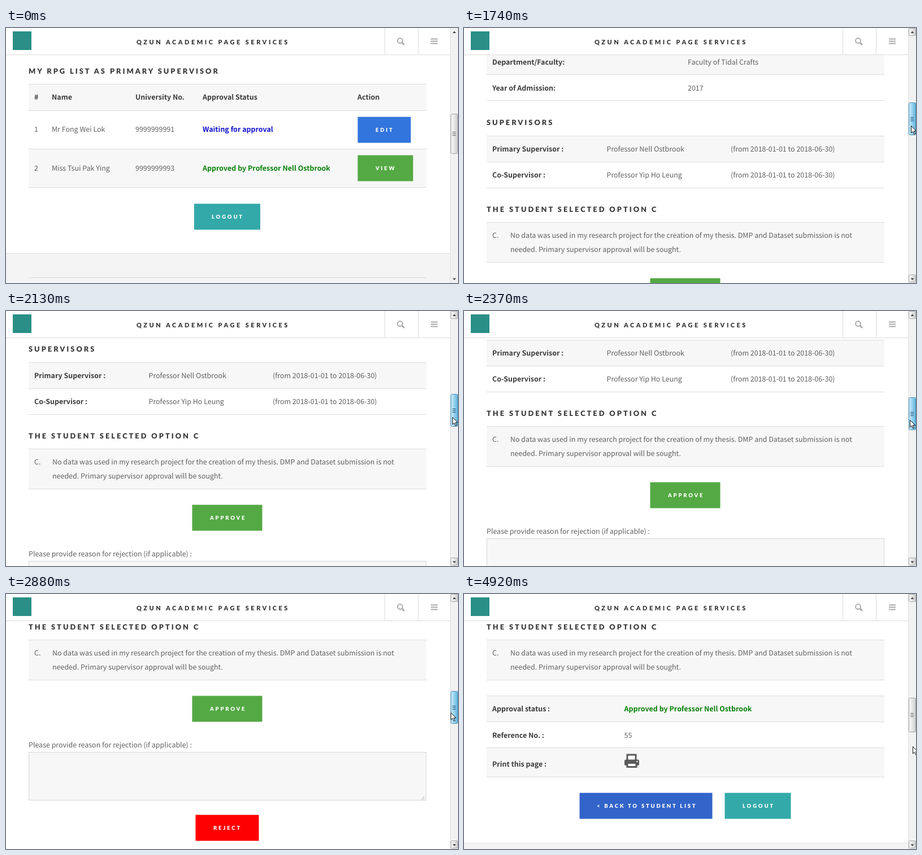
These frames come from a looping animation (800 px wide and 452 px high, 6180 ms). An HTML page:

```html
<!DOCTYPE html>
<html lang="en">
<head>
<meta charset="utf-8">
<title>Thesis approval walkthrough</title>
<style>
  html, body { margin: 0; width: 100%; height: 100%; overflow: hidden; background: #fff; }
  svg { display: block; width: 800px; height: 452px; }
  text { white-space: pre; text-rendering: geometricPrecision; }
  .body, .bold { font: 12.46px "Noto Sans CJK SC", "Noto Sans CJK JP", "Noto Sans CJK", "Noto Sans", sans-serif; fill: #606060; }
  .bold { font-weight: 700; fill: #3c3b3b; }
  .head, .title, .button { font: 900 12.8px Lato, sans-serif; letter-spacing: 3px; fill: #3a3939; }
  .title { font-size: 11px; letter-spacing: 3.5px; }
  .button { font-size: 9.6px; letter-spacing: 2.75px; fill: #fff; }
</style>
</head>
<body>
<svg id="stage" viewBox="0 0 800 452"></svg>
<script>
const LOOP = 6180, STEP = 30;
const RIGHT = 744, LEFT = 40;
const SIZES = { body: 12.46, bold: 12.46, head: 12.8, title: 11, button: 9.6 };

// Markup helpers; text is placed by the middle of its capitals.
const text = (x, middle, content, style = 'body', color = '') =>
  `<text x="${x}" y="${middle + SIZES[style] * 0.38}" class="${style}" ${color && `style="fill:${color}"`}>${content}</text>`;
const rect = (x, y, w, h, fill, extra = '') =>
  `<rect x="${x}" y="${y}" width="${w}" height="${h}" fill="${fill}" ${extra}/>`;
const rule = y => rect(LEFT, y, RIGHT - LEFT, 1, '#dcdcdc');
const band = (top, bottom) => rect(LEFT, top, RIGHT - LEFT, bottom - top, '#f7f7f7') + rule(top) + rule(bottom);
const button = (x, y, w, textX, label, fill, id = '') =>
  rect(x + 0.5, y + 0.5, w - 1, 46, fill, id && `id="${id}"`) +
  text(textX, y + 23.5, label, 'button');
const row = (y, cells) => cells.map(([x, content, style, color]) => text(x, y, content, style, color)).join('');
const footer = y => rect(0, y, 787, 452, '#f4f4f4') + rect(0, y, 787, 1, '#e2e2e2');

const SUPERVISOR = 'Professor Nell Ostbrook';
const PERIOD = '(from 2018-01-01 to 2018-06-30)';
const GREEN = '#54a944', TEAL = '#33a9a9', BLUE = '#3275dc';

const listPage =
  text(LEFT, 76, 'MY RPG LIST AS PRIMARY SUPERVISOR', 'head') +
  band(99, 146) + band(214, 282) +
  row(122.5, [[50, '#', 'bold'], [81, 'Name', 'bold'], [229, 'University No.', 'bold'],
    [348, 'Approval Status', 'bold'], [622, 'Action', 'bold']]) +
  row(179.5, [[50, '1'], [81, 'Mr Fong Wei Lok'], [229, '9999999991'],
    [348, 'Waiting for approval', 'bold', '#1111cc']]) +
  row(248, [[50, '2'], [81, 'Miss Tsui Pak Ying'], [229, '9999999993'],
    [348, `Approved by ${SUPERVISOR}`, 'bold', '#0a800a']]) +
  button(622, 157, 95, 654, 'EDIT', BLUE, 'edit') +
  button(622, 225, 99, 654, 'VIEW', GREEN) +
  button(332.5, 311, 118, 364, 'LOGOUT', TEAL) +
  footer(399) + rule(442);

const details =
  band(83, 129) + rule(175) +
  row(61, [[50, 'Degree:', 'bold'], [396, 'Doctor of Philosophy']]) +
  row(107, [[50, 'Department/Faculty:', 'bold'], [396, 'Faculty of Tidal Crafts']]) +
  row(153, [[50, 'Year of Admission:', 'bold'], [396, '2017']]) +
  text(LEFT, 214, 'SUPERVISORS', 'head') +
  band(238, 284) + rule(330) +
  row(261, [[50, 'Primary Supervisor :', 'bold'], [252.5, SUPERVISOR], [472, PERIOD]]) +
  row(307, [[50, 'Co-Supervisor :', 'bold'], [252.5, 'Professor Yip Ho Leung'], [472, PERIOD]]) +
  text(LEFT, 368.5, 'THE STUDENT SELECTED OPTION C', 'head') +
  band(391, 462) +
  row(414.5, [[50, 'C.'], [82, 'No data was used in my research project for the creation of my thesis. DMP and Dataset submission is not']]) +
  text(82, 439, 'needed. Primary supervisor approval will be sought.');

const approvalForm =
  button(329, 490, 125, 361, 'APPROVE', GREEN, 'approve') +
  text(LEFT, 577, 'Please provide reason for rejection (if applicable) :') +
  rect(40.5, 590.5, 703, 85, '#f7f7f7', 'stroke="#d6d6d6"') +
  '<path d="M735 673.5h6M737 671.5h4M739 669.5h2" stroke="#999" stroke-dasharray="1 1"/>' +
  button(335, 701, 113, 367, 'REJECT', '#f00');

const approvedResult =
  band(490, 536) + band(582, 634) +
  row(513.5, [[50, 'Approval status :', 'bold'], [283.5, `Approved by ${SUPERVISOR}`, 'bold', '#0a800a']]) +
  row(560, [[50, 'Reference No. :', 'bold'], [283.5, '55']]) +
  text(50, 611, 'Print this page :', 'bold') +
  `<g transform="translate(284 593)">${rect(5, 2, 15, 12, '#fff', 'stroke="#5a5a5a" stroke-width="3"')}
    ${rect(0, 10.5, 26, 10.5, '#5a5a5a', 'rx="2.5"')}${rect(5, 16.5, 16, 7, '#fff', 'stroke="#5a5a5a" stroke-width="3"')}
    <circle cx="22.5" cy="14" r="1.2" fill="#fff"/></g>` +
  button(204, 662, 236, 235, '&lt; BACK TO STUDENT LIST', '#3264ca') +
  button(461, 662, 118, 493, 'LOGOUT', TEAL) +
  footer(751);

const header =
  rect(0, 0, 787, 47, '#fff') + rect(0, 47, 787, 1, '#dcdcdc') +
  rect(670, 0, 1, 47, '#dcdcdc') + rect(729, 0, 1, 47, '#dcdcdc') +
  rect(12, 6, 33, 33, '#2a8f86') +
  text(231, 25, 'QZUN ACADEMIC PAGE SERVICES', 'title') +
  '<g fill="none" stroke="#a9a9a9" stroke-width="2"><circle cx="697.5" cy="22.5" r="4.4" /><path d="M701 26l4 4" stroke-width="2.6"/>' +
  '<path d="M752 19.5h12M752 23.5h12M752 27.5h12" stroke-width="1.8"/></g>';

const gradient = (id, from, to) =>
  `<linearGradient id="${id}"><stop offset=".1" stop-color="${from}"/><stop offset="1" stop-color="${to}"/></linearGradient>`;
const arrowBox = y => rect(787.5, y + 0.5, 12, 13, 'url(#plain)', 'rx="1.5" stroke="#aaa"');

const scrollbar =
  rect(786, 0, 14, 452, '#f1f1f1') + rect(786, 0, 1, 452, '#e2e2e2') +
  `<g id="arrowBoxes">${arrowBox(0)}${arrowBox(437)}</g>` +
  '<path d="M790.5 9l3-3.5 3 3.5zM790.5 443.5l3 3.5 3-3.5z" fill="#444"/>' +
  rect(787.5, 0, 12, 0, 'url(#plain)', 'rx="2" id="thumb"') +
  '<path id="grip" d="M790 -2.5h6M790 .5h6M790 3.5h6"/>';

const cursors =
  `<g id="cursor" fill="#fff" stroke="#111" stroke-linejoin="round">
    <path id="arrow" d="M.5 .5V13l3-2.7 2.2 5 2-.9-2.2-4.8h4z"/>
    <path id="hand" transform="translate(-5.4 -.5)" d="M3.5 12V1.8q0-1.5 1.3-1.5t1.3 1.5V7q.2-1 1.4-1 1.2.1 1.3 1.2.2-.7 1.3-.6 1.1.1 1.2 1.2.3-.5 1.1-.4 1 .2 1 1.5V13q0 2-1.5 4v2.5H5v-2L1 11.5q-.6-1.5.4-1.8 1-.2 2.1 1.6z"/>
  </g>`;

document.getElementById('stage').innerHTML =
  `<defs>${gradient('plain', '#f6f6f6', '#cfcfcf')}${gradient('hover', '#e4f4fd', '#a9d8f2')}${gradient('pressed', '#c4e8f9', '#5fb4de')}</defs>
  <g id="list">${listPage}</g>
  <g id="record">${details}<g id="form">${approvalForm}</g><g id="result">${approvedResult}</g></g>
  ${header}${scrollbar}${cursors}`;

const el = Object.fromEntries([...document.querySelectorAll('#stage [id]')].map(node => [node.id, node]));
const show = (node, visible) => node.setAttribute('display', visible ? 'inline' : 'none');
const set = (node, attributes) => Object.entries(attributes).forEach(([k, v]) => node.setAttribute(k, v));

// Each key is [time, value, ...]; values are linear between keys.
const scrollKeys = [[1620, 0], [1920, 117], [2250, 164], [2370, 187], [2880, 310], [4499, 310],
  [4500, 0], [4740, 0], [4920, 310]];
const cursorKeys = [[480, 812, 205], [720, 667, 183], [1050, 667, 183], [1500, 791, 166], [1620, 791, 166],
  [1920, 791, 184], [2370, 789, 193], [2880, 787, 210], [3630, 787, 210], [4170, 366, 225],
  [4740, 366, 225], [4770, 791, 218], [4920, 794, 270]];

function sample(keys, t) {
  const next = keys.findIndex(key => key[0] > t);
  if (next === 0) return keys[0].slice(1);
  if (next < 0) return keys[keys.length - 1].slice(1);
  const a = keys[next - 1], b = keys[next], p = (t - a[0]) / (b[0] - a[0]);
  return a.slice(1).map((v, i) => Math.round(v + (b[i + 1] - v) * p));
}

function render(time) {
  const t = Math.floor(time / STEP) * STEP;
  const page = t < 1050 ? 'list' : t < 4500 ? 'form' : 'result';
  const [scroll] = sample(scrollKeys, t);
  const [x, y] = sample(cursorKeys, t);

  show(el.list, page === 'list');
  show(el.record, page !== 'list');
  show(el.form, page === 'form');
  show(el.result, page === 'result');
  set(el.record, { transform: `translate(0 ${-scroll})` });

  const onEdit = page === 'list' && x < 717;
  const onApprove = page === 'form' && x < 454;
  set(el.edit, { fill: onEdit ? '#6f9ee6' : BLUE, stroke: onEdit ? '#4a8cff' : 'none' });
  set(el.approve, { fill: onApprove ? '#88ba79' : GREEN, stroke: onApprove ? '#78e850' : 'none' });

  const [top, length] = {
    list: [152, 71],
    form: [125 + Math.round(scroll / 6.6), 58],
    result: [131 + Math.round(scroll * 53 / 310), 61]
  }[page];
  const overBar = t >= 510 && x >= 787;
  const pressed = (t >= 1650 && t < 3480) || (t >= 4770 && t < 4920);
  const hovered = overBar && y >= top && y <= top + length;
  const state = pressed ? 'pressed' : hovered ? 'hover' : 'plain';
  const lit = state !== 'plain';
  set(el.thumb, { y: top + 0.5, height: length - 1, fill: `url(#${state})`, stroke: lit ? '#4a8fb8' : '#a0a0a0' });
  set(el.grip, { transform: `translate(0 ${top + Math.floor(length / 2)})`, stroke: lit ? '#234f78' : '#666' });
  show(el.arrowBoxes, overBar);

  const hand = onEdit || onApprove || t === 1050 || t === 4500;
  show(el.cursor, t >= 510);
  show(el.hand, hand);
  show(el.arrow, !hand);
  set(el.cursor, { transform: `translate(${x} ${y})` });
}

function tick() {
  render(performance.now() % LOOP);
  requestAnimationFrame(tick);
}
tick();
</script>
</body>
</html>
```
